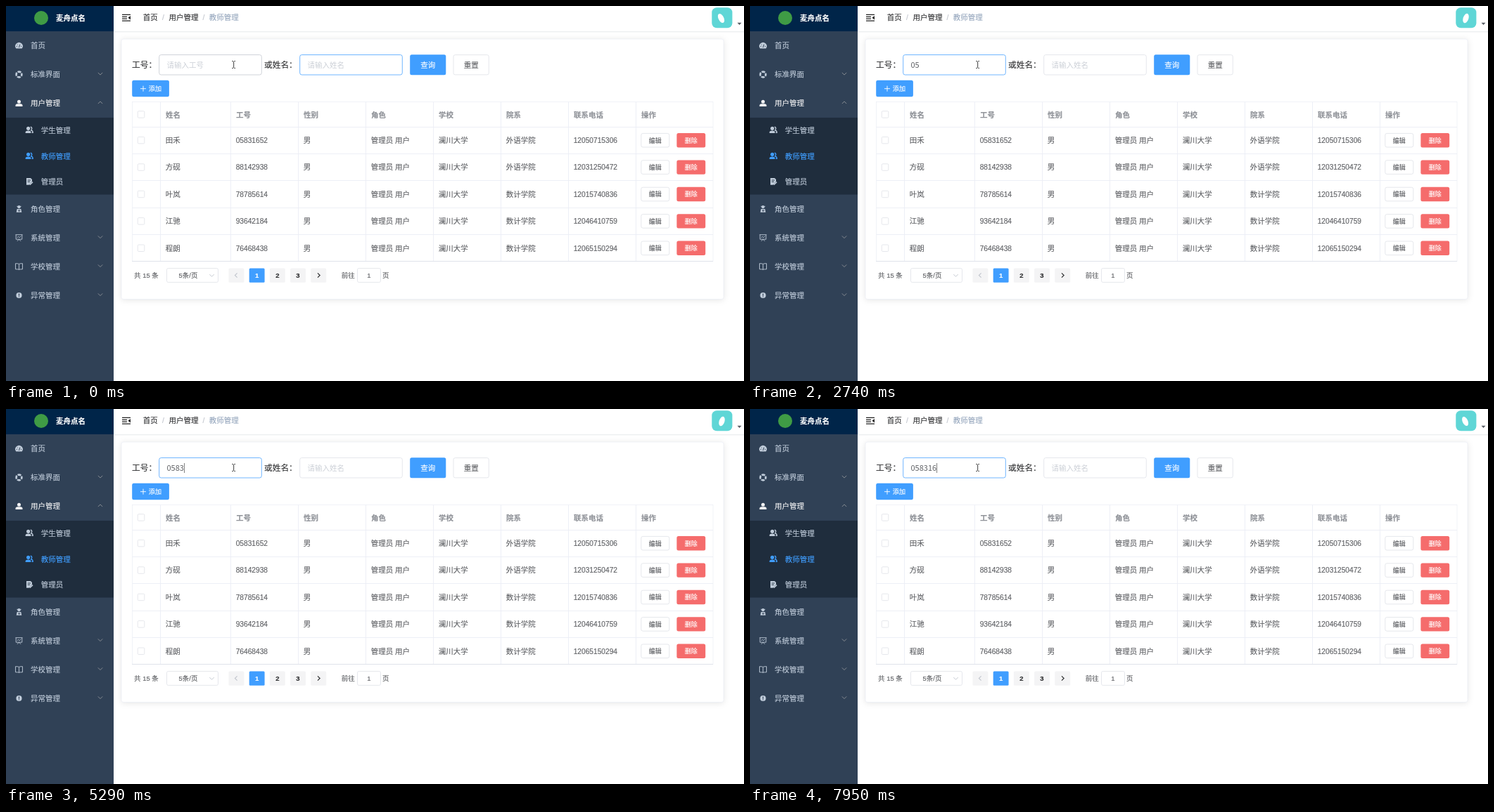
Animation, 1049 px wide and 534 px high, one loop 8000 ms. Source, as an HTML page:

```html
<!DOCTYPE html>
<html lang="zh-CN">
<head>
<meta charset="utf-8">
<title>教师管理</title>
<style>
html, body { margin: 0; width: 100%; height: 100%; overflow: hidden; background: #fff; }
svg { display: block; font-family: "Liberation Sans", "Noto Sans CJK SC", "Noto Sans CJK", sans-serif; }
rect { stroke-width: .75; }
text { stroke-width: .15; }
.field { font-family: "Noto Sans CJK SC", "Noto Sans CJK", sans-serif; font-weight: 300; stroke: none; }
.card { filter: drop-shadow(0 1.5px 4px rgba(0, 0, 0, .1)); }
</style>
</head>
<body>
<svg id="stage" width="1049" height="534" viewBox="0 0 1049 534"></svg>
<script>
const BLUE = '#409eff', RED = '#f56c6c', LINE = '#dcdfe6', GRID = '#ebeef5',
  INK = '#606266', MENU = '#bfcbd9', HINT = '#c0c4cc', FAINT = '#ccd0d7';

// y is the vertical middle of the line
const text = (x, y, s, fill = INK, size = 10.5, more = '') =>
  `<text x="${x}" y="${y + size * .37}" fill="${fill}" stroke="${fill}" font-size="${size}" ${more}>${s}</text>`;
const mid = (x, y, s, fill, size, more = '') =>
  text(x, y, s, fill, size, 'text-anchor="middle" ' + more);
const box = (x, y, w, h, fill, stroke = 'none', r = 2.5, more = '') =>
  `<rect x="${x}" y="${y}" width="${w}" height="${h}" rx="${r}" fill="${fill}" stroke="${stroke}" ${more}/>`;
const line = (d, stroke, width = 1, more = '') =>
  `<path d="${d}" fill="none" stroke="${stroke}" stroke-width="${width}" ${more}/>`;
const shape = (d, fill) => `<path d="${d}" fill="${fill}"/>`;
const dot = (x, y, r, fill) => `<circle cx="${x}" cy="${y}" r="${r}" fill="${fill}"/>`;
const at = (x, y, s) => `<g transform="translate(${x} ${y})">${s}</g>`;
const chevron = (x, y, dir, color = '#909399') =>
  line(`M${x - 3.2} ${y - 1.6 * dir}l3.2 ${3.2 * dir}l3.2 ${-3.2 * dir}`, color, .9);
const button = (x, y, w, h, label, fill, size = 10.5) => fill
  ? box(x, y, w, h, fill) + mid(x + w / 2, y + h / 2, label, '#fff', size)
  : box(x + .4, y + .4, w - .8, h - .8, '#fff', LINE) + mid(x + w / 2, y + h / 2, label, INK, size);

// Menu icons, centred on 0,0
const person = c => dot(0, -2.3, 2.5, c) + shape('M-5 4.6V3.4Q-5 .8 -2 .8H2Q5 .8 5 3.4V4.6Z', c);
const icons = {
  gauge: c => shape('M-4.2 4A5.3 5.3 0 1 1 4.2 4Z', c) +
    line('M0 2.5L1.4 -1.8M-3.7 1h1M2.7 1h1M-2.6 -2l.7 .7', '#304156', 1),
  ring: c => `<circle r="3.9" fill="none" stroke="${c}" stroke-width="2.6" stroke-dasharray="4.9 1.225" stroke-dashoffset="2.45"/>`,
  person,
  people: c => dot(-1.3, -2.2, 2.6, c) + shape('M-5.3 4.5V3Q-5 1 -1.3 1Q2.2 1 2.4 3V4.5Z', c) +
    line('M1.8 -4.4Q4.2 -3.8 3.6 -1.2L2.6 .5Q5.2 1 5.2 3.8H3.6', c, 1.3),
  paper: c => shape('M-4 -5H2L4 -3V0L0 4.8H-4Z', c) +
    line('M-2.3 -2H2M-2.3 .3H1', '#1f2d3d', .9) + line('M.8 4.6L5 .6', c, 1.5),
  role: c => dot(0, -2.8, 2.1, c) + line('M-3 -3.6H3', c, 1) +
    shape('M-3.8 4.8L-2.8 0H2.8L3.8 4.8Z', c) + line('M-1.5 2.2H2M.2 .8V4', '#304156', .8),
  screen: c => line('M-5 -4.3H5M-4.3 -4.3V2.2H4.3V-4.3M-2.5 4.8L0 2.2L2.5 4.8', c, .9) +
    line('M-2.6 -.2L-.8 -1.7L.6 -.2L2.8 -2.3', c, .9),
  book: c => line('M0 -3.6V4.4M0 -3.6Q-1 -4.4 -5 -4.3V3.8Q-1 3.7 0 4.4Q1 3.7 5 3.8V-4.3Q1 -4.4 0 -3.6', c, .9),
  alert: c => dot(0, 0, 4.1, c) + line('M0 -2.5V.7M0 1.6V2.6', '#304156', 1.1),
};

// label, icon, y, chevron direction, colour
const menu = [
  ['首页', 'gauge', 56.5, 0], ['标准界面', 'ring', 97.5, 1],
  ['用户管理', 'person', 138.5, -1, '#f4f4f5'],
  ['角色管理', 'role', 289, 0], ['系统管理', 'screen', 330, 1],
  ['学校管理', 'book', 371, 1], ['异常管理', 'alert', 412, 1],
];
const submenu = [
  ['学生管理', 'people', 177], ['教师管理', 'people', 214, BLUE], ['管理员', 'paper', 250.5],
];

function sidebar() {
  let s = box(0, 0, 153, 534, '#304156', 'none', 0) + box(0, 0, 153, 36, '#002549', 'none', 0) +
    box(0, 159, 153, 109.5, '#1f2d3d', 'none', 0) +
    dot(50, 17, 10, '#3f9b45') + text(71, 17, '麦舟点名', '#fff', 10.5, 'font-weight="700"');
  for (const [label, icon, y, dir, c = MENU] of menu)
    s += at(18.5, y, icons[icon](c)) + text(35, y, label, c) + (dir ? chevron(134, y - 1, dir) : '');
  for (const [label, icon, y, c = MENU] of submenu)
    s += at(33, y - .5, icons[icon](c)) + text(49.7, y, label, c);
  return s;
}

function navbar() {
  return line('M153 36.5H1049', '#eceef0') + line('M153 37.5H1049', '#f8f9fa') +
    line('M165 12.3H177M165 15.3H172M165 18.2H172M165 21.2H177', '#222', 1.3) +
    shape('M177 14V19.5L173.4 16.75Z', '#222') +
    text(194.7, 16.5, '首页', '#303133') + mid(223.5, 16.5, '/', HINT) +
    text(231.5, 16.5, '用户管理', '#303133') + mid(281, 16.5, '/', HINT) +
    text(288.7, 16.5, '教师管理', '#97a8be') +
    box(1003.3, 2.2, 29.1, 29.1, '#5fd6d6', 'none', 7) +
    '<ellipse id="figure" rx="3.8" ry="7" fill="#fff"/>' +
    shape('M1039.5 23.7H1045.5L1042.5 27Z', '#5a5e66');
}

function form() {
  return text(179, 84, '工号：', '#303133', 11.7) + text(367, 84, '或姓名：', '#303133', 11.7) +
    box(217.7, 69.5, 145.6, 28.5, '#fff', LINE, 2.8, 'id="idBox"') +
    box(417.7, 69.5, 145.6, 28.5, '#fff', LINE, 2.8, 'id="nameBox"') +
    text(228.5, 84, '', HINT, 11, 'id="idText" class="field"') +
    text(428.5, 84, '请输入姓名', FAINT, 10.5, 'class="field"') +
    line('M0 77V91', '#555', .75, 'id="caret"') +
    line('M321.3 78.5H323M324.4 78.5H326M323.7 79V88M321.3 88.5H323M324.4 88.5H326', '#222', .9) +
    button(574.2, 69.2, 51.1, 29.1, '查询', BLUE) + button(635.6, 69.2, 51.1, 29.1, '重置') +
    box(179.2, 105.8, 52.7, 23.4, BLUE) + line('M191 117.7H199M195 113.7V121.7', '#fff', .9) +
    text(202.8, 117.7, '添加', '#fff', 9.1);
}

const columns = [219.5, 319.5, 415.5, 511.5, 607.5, 703.5, 799.5, 895.5];
const heads = ['姓名', '工号', '性别', '角色', '学校', '院系', '联系电话', '操作'];
const staff = [
  ['田禾', '05831652', '外语学院', '12050715306'], ['方砚', '88142938', '外语学院', '12031250472'],
  ['叶岚', '78785614', '数计学院', '12015740836'], ['江驰', '93642184', '数计学院', '12046410759'],
  ['程朗', '76468438', '数计学院', '12065150294'],
];

function table() {
  const check = y => box(187.3, y - 4.8, 9.5, 9.5, '#fff', LINE, 1.3);
  let s = box(179.5, 136.5, 825.5, 227, '#fff', GRID, 0) + check(154.5) +
    columns.map(x => line(`M${x} 136.5V363.5`, GRID, .9)).join('') +
    heads.map((h, i) => text(columns[i] + 7.4, 154.7, h, '#909399', 10.5, 'font-weight="700"')).join('');
  staff.forEach(([name, id, school, phone], row) => {
    const y = 191.2 + row * 38.4;
    s += line(`M179.5 ${Math.round(y - 19.7) + .5}H1005`, GRID, .9) + check(y) +
      [name, id, '男', '管理员 用户', '澜川大学', school, phone]
        .map((v, i) => text(columns[i] + 7.2, y, v, INK, /^\d/.test(v) ? 10.2 : 10.5)).join('') +
      button(902.4, y - 10.2, 40.8, 20.4, '编辑', '', 9) +
      button(953.4, y - 10.2, 40.8, 20.4, '删除', RED, 9);
  });
  return s + line('M179 363.5H1005', '#dfe3ea');
}

function pager() {
  const y = 383.7, pitch = 29.2, bold = 'font-weight="700"';
  const cell = (i, fill) => box(316.5 + i * pitch, 373.4, 21.9, 20.4, fill, 'none', 1.5);
  let s = text(182, y, '共 15 条', INK, 9.5) +
    box(228.5, 373.6, 73, 19.8, '#fff', LINE, 2) + mid(259, y, '5条/页', INK, 9.5) +
    chevron(292.5, y, 1, HINT);
  for (let i = 0; i < 5; i++) s += cell(i, i == 1 ? BLUE : '#f4f4f5');
  for (let n = 1; n < 4; n++)
    s += mid(327.4 + n * pitch, y, n, n == 1 ? '#fff' : '#303133', 9.6, bold);
  return s + line('M328.6 380.3L325.4 383.5L328.6 386.7', HINT, 1.1) +
    line('M443 380.3L446.2 383.5L443 386.7', '#303133', 1.2) +
    text(476.7, y, '前往', INK, 9.5) + box(499.5, 373.6, 33, 19.8, '#fff', LINE, 2) +
    mid(515.8, y, '1', INK, 9.5) + text(535, y, '页', INK, 9.5);
}

const $ = id => document.getElementById(id);
$('stage').innerHTML = sidebar() + navbar() +
  box(164, 47, 856, 370.5, '#fff', GRID, 3, 'class="card"') + form() + table() + pager();

const LOOP = 8000, FOCUS = 400, STEP = 80, SWAY = 795;
const typed = '058316', keys = [2200, 2720, 3900, 5150, 6200, 6940];
const mix = (a, b, k) => `rgb(${a.map((v, i) => Math.round(v + (b[i] - v) * k))})`;
const blue = [64, 158, 255], grey = [220, 223, 230], hover = [192, 196, 204];

function draw(t) {
  const focus = Math.min(1, Math.max(0, (t - FOCUS) / 200));
  $('idBox').setAttribute('stroke', mix(hover, blue, focus));
  $('nameBox').setAttribute('stroke', mix(blue, grey, focus));

  const count = keys.filter(k => k <= t).length;
  const label = $('idText');
  label.textContent = count ? typed.slice(0, count) : '请输入工号';
  label.setAttribute('fill', count ? INK : FAINT);
  label.setAttribute('font-size', count ? 11 : 10.5);

  // The caret restarts its blink at each key
  const since = t - (count ? keys[count - 1] : FOCUS);
  const shown = since > 30 && since % 1000 < 500;
  $('caret').setAttribute('visibility', shown ? 'visible' : 'hidden');
  $('caret').setAttribute('transform', `translate(${229.3 + count * 6.05} 0)`);

  // The figure stands upright and leans over once per sway
  const phase = Math.floor(t / STEP) * STEP / SWAY * 2 * Math.PI;
  const lean = Math.max(0, Math.cos(phase)) ** 3;
  $('figure').setAttribute('transform',
    `translate(${1017.5 - lean} 17.5) rotate(${18 - lean * 45})`);
}

const start = performance.now();
(function tick() {
  draw((performance.now() - start) % LOOP);
  requestAnimationFrame(tick);
})();
</script>
</body>
</html>
```
